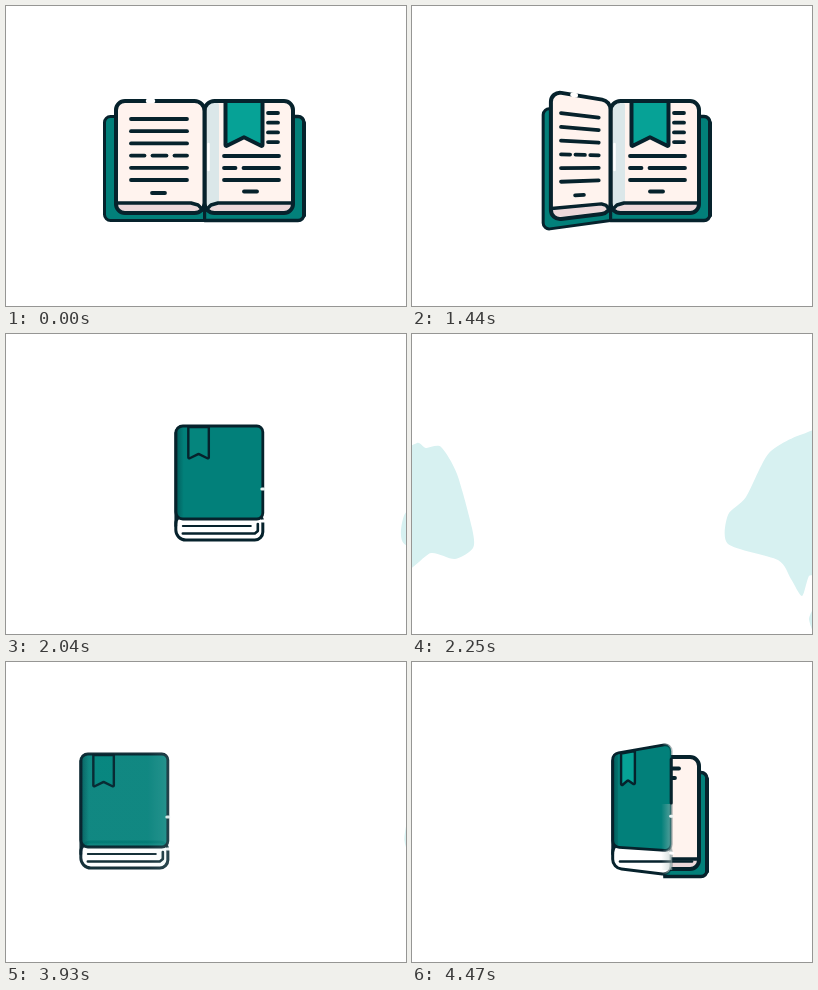
Animation, 400 px wide and 300 px high, one loop 4500 ms. Source, as an HTML page with a canvas:

```html
<!DOCTYPE html>
<html lang="en">
<head>
<meta charset="utf-8">
<title>Book</title>
<style>
  html, body { margin: 0; width: 100%; height: 100%; overflow: hidden; background: #fff; }
  canvas { display: block; width: 400px; height: 300px; }
</style>
</head>
<body>
<canvas id="stage" width="400" height="300"></canvas>
<script>
const ctx = document.getElementById('stage').getContext('2d');
const LOOP = 4500, STEP = 30, MID = 198.5;
const INK = '#06222c', TEAL = '#02807a', MARK = '#06a296', PAPER = '#fff3ee',
      BAND = '#ecd8da', SHADE = '#dbe7e9', MIST = '#d7f1f1';

const clamp = v => Math.max(0, Math.min(1, v));
const span = (t, a, b) => clamp((t - a) / (b - a));
const rush = p => Math.pow(p, 2.85);
const flat = (x, y) => [x, y];
const mirror = (x, y) => [2 * MID - x, y];

// Turns a half of the book around its spine; the free edge grows towards the viewer.
const turn = (angle, spine) => (x, y) => {
  const d = Math.abs(x - spine);
  return [spine - d * Math.cos(angle), 160 + (y - 160) * (1 + d / 95 * .22 * Math.sin(angle))];
};

function paint(fill, stroke, width) {
  if (fill) { ctx.fillStyle = fill; ctx.fill(); }
  if (stroke) { ctx.strokeStyle = stroke; ctx.lineWidth = width; ctx.stroke(); }
}

// Closed shape from [x, y, corner radius] points.
function shape(pts, map, fill, stroke, width) {
  const p = pts.map(([x, y, r]) => [...map(x, y), r || 0]);
  const n = p.length, last = p[n - 1];
  const gap = (a, b) => Math.hypot(a[0] - b[0], a[1] - b[1]) / 2;
  ctx.beginPath();
  ctx.moveTo((last[0] + p[0][0]) / 2, (last[1] + p[0][1]) / 2);
  p.forEach((c, i) => {
    const next = p[(i + 1) % n], prev = p[(i + n - 1) % n];
    ctx.arcTo(c[0], c[1], next[0], next[1], Math.min(c[2], gap(c, next), gap(c, prev)));
  });
  ctx.closePath();
  paint(fill, stroke, width);
}

// Rectangle with outer (left) and inner (right) corner radii.
const box = (l, t, r, b, outer, inner, map, ...style) =>
  shape([[l, t, outer], [r, t, inner], [r, b, inner], [l, b, outer]], map, ...style);

function line(pts, map, width, color = INK) {
  ctx.beginPath();
  pts.forEach(([x, y]) => ctx.lineTo(...map(x, y)));
  paint(null, color, width);
}

// Smooth closed curve through a few points.
function blob(pts, dx) {
  const n = pts.length, at = i => pts[(i + n) % n];
  ctx.beginPath();
  ctx.moveTo(pts[0][0] + dx, pts[0][1]);
  pts.forEach((a, i) => {
    const b = at(i + 1), before = at(i - 1), after = at(i + 2);
    ctx.bezierCurveTo(a[0] + (b[0] - before[0]) / 8 + dx, a[1] + (b[1] - before[1]) / 8,
                      b[0] - (after[0] - a[0]) / 8 + dx, b[1] - (after[1] - a[1]) / 8, b[0] + dx, b[1]);
  });
  paint(MIST);
}

function ribbon(l, t, r, b, map, fill, width) {
  shape([[l, t], [r, t], [r, b, 1], [(l + r) / 2, b - (r - l) / 4, 1], [l, b, 1]], map, fill, INK, width);
}

// A row of text, cut into equal or given parts.
function row(l, r, y, map, cuts = []) {
  const ends = [l, ...cuts, r];
  for (let i = 0; i + 1 < ends.length; i++) {
    const from = ends[i] + (i ? 4 : 0), to = ends[i + 1] - (i + 2 < ends.length ? 4 : 0);
    line([[from, y], [to, y]], map, 3.8);
  }
}

function page(map, shaded) {
  box(110, 95, MID, 207, 9, 10, map, PAPER);
  if (shaded) box(184, 97, 196, 202, 2, 4, map, SHADE);
  shape([[111, 197], [184, 197], [197, 205], [111, 205, 4]], map, BAND);
  line([[111, 197], [185, 197], [192, 199], [197, 204]], map, 3.4);
  box(110, 95, MID, 207, 9, 10, map, null, INK, 4);
}

function leftHalf(map) {
  box(98.5, 110.5, MID, 214.5, 6, 0, map, TEAL, INK, 3);
  page(map);
  line([[142, 95], [147, 95]], map, 4.5, '#fff');
  for (let i = 0; i < 6; i++) row(125, 181, 113 + i * 12.2, map, i === 3 ? [142.5, 164.5] : []);
  row(146, 159, 187, map);
}

function rightHalf(turned, shrink) {
  const r = 298 - 3 * turned - 6 * shrink, b = 214.5 - 8 * shrink;
  box(r, 110.5, MID, b, 6, 0, flat, TEAL, INK, 3.4);
  line([[r, 117], [r, b - 5]], flat, 4);
  page(mirror, !turned);
  if (turned) {
    row(259, 267, 106.5, flat);
    row(259, 263, 116, flat);
    return;
  }
  line([[202.5, 138], [202.5, 164]], flat, 2.5, '#fff');
  ribbon(219.5, 95, 256.5, 140.5, flat, MARK, 4);
  for (let i = 0; i < 4; i++) row(262, 272, 107 + i * 9.7, flat);
  for (let i = 0; i < 3; i++) row(218, 273, 150 + i * 12, flat, i === 1 ? [233.5] : []);
  row(238, 251, 185.5, flat);
}

// Fade across x, from one colour to another.
function fade(from, to, a, b) {
  const g = ctx.createLinearGradient(from, 0, to, 0);
  g.addColorStop(0, a);
  g.addColorStop(1, b);
  return g;
}

function frontCover(angle) {
  const map = turn(angle, 200), level = (x, y) => [map(x, y)[0], y];
  const shut = clamp((angle / Math.PI - .75) / .25);
  const edge = map(288, 0)[0];
  const rim = fade(edge - 9, edge, INK, `rgba(6,34,44,${.3 + .7 * shut})`);

  box(201, 180, 288, 206, 10, 8, map, '#fff', rim, 3);
  if (shut) line([[208, 192], [276, 192]], level, 2);
  line([[208, 199.5], [280, 199.5], ...(shut ? [[283, 197], [283, 190]] : [])], flat, 2.6);

  box(201, 92, 288, 185, 7, 6, map, TEAL);
  box(201, 92, 209, 185, 5, 0, map, fade(200, 209, 'rgba(3,65,68,.65)', 'rgba(3,65,68,0)'));
  ribbon(213.5, 93, 234, 125, map, shut > .8 ? '#05857d' : MARK, 2.4);
  if (shut < 1) {
    ctx.save();
    ctx.globalAlpha *= 1 - shut;
    ctx.fillStyle = fade(edge - 10, edge + 2, 'rgba(170,190,188,0)', 'rgba(170,190,188,.6)');
    ctx.fillRect(edge - 10, 142, 11, 66);
    line([[edge, 97], [edge, 141]], flat, 3);
    ctx.restore();
  }
  box(201, 92, 288, 185, 7, 6, map, null, rim, 2.8);
  line([[201, 99], [201, 192]], map, 2.8);
  line([[287, 155], [289, 155]], map, 3, '#e8f3f2');
  line([[287, 187], [290, 187]], map, 3, '#fff');
}

// Openness u runs from 0 (lying open) to 1 (shut).
function book(u) {
  const angle = Math.PI * u, past = u >= .5;
  ctx.save();
  if (past) {
    ctx.beginPath();
    ctx.rect(192 - 88 * Math.cos(angle), 0, 400, 300);
    ctx.clip();
  }
  if (u < 1) rightHalf(past ? 1 : 0, clamp((u - .75) / .25));
  ctx.restore();
  if (past) frontCover(angle);
  else leftHalf(turn(angle, MID));
}

// The shut book moved sideways, dissolving into mist.
function slide(dx, haze) {
  ctx.save();
  ctx.translate(dx, 0);
  if (haze) ctx.filter = `blur(${1.2 * haze}px)`;
  ctx.globalAlpha = 1 - .25 * haze;
  book(1);
  ctx.globalAlpha = haze;
  box(200, 91, 289, 207, 8, 8, flat, fade(268, 290, 'rgba(190,228,226,.1)', 'rgba(190,228,226,.75)'));
  ctx.restore();
}

const LEFT = [[-9, 127], [5, 109], [14, 114], [29, 113], [45, 140], [60, 194], [61, 214], [43, 225], [19, 219], [-9, 233]];
const RIGHT = [[409, 106], [391, 100], [357, 119], [334, 163], [316, 181], [316, 210], [366, 226], [379, 245],
  [390, 262], [397, 242], [409, 232]];
const DROP = [[409, 268], [397, 285], [409, 312]];
const LEAVING = [[409, 96], [390, 85], [367, 117], [352, 178], [371, 213], [382, 220], [389, 235], [409, 212]];

function draw(t) {
  ctx.fillStyle = '#fff';
  ctx.fillRect(0, 0, 400, 300);
  ctx.lineCap = ctx.lineJoin = 'round';
  if (t < 1890) {
    book(Math.pow(span(t, 1140, 1890), 1.45));
  } else if (t < 3810) {
    const out = span(t, 1890, 2220), away = 1 - span(t, 2010, 2250);
    blob(LEFT, -72 * away);
    blob(RIGHT, 94 * away);
    if (!away) blob(DROP, 0);
    if (out < 1) slide(-295 * rush(out), span(t, 2040, 2220));
  } else if (t < 4350) {
    const arrive = span(t, 3810, 3960);
    blob(LEAVING, 58 * arrive);
    slide(-271 * rush(1 - span(t, 3810, 4320)), 1 - arrive);
  } else {
    book(1 - .265 * span(t, 4320, 4470));
  }
}

const start = performance.now();
function tick(now) {
  const t = Math.max(0, now - start) % LOOP;
  draw(Math.floor(t / STEP + .01) * STEP);
  requestAnimationFrame(tick);
}
draw(0);
requestAnimationFrame(tick);
</script>
</body>
</html>
```
